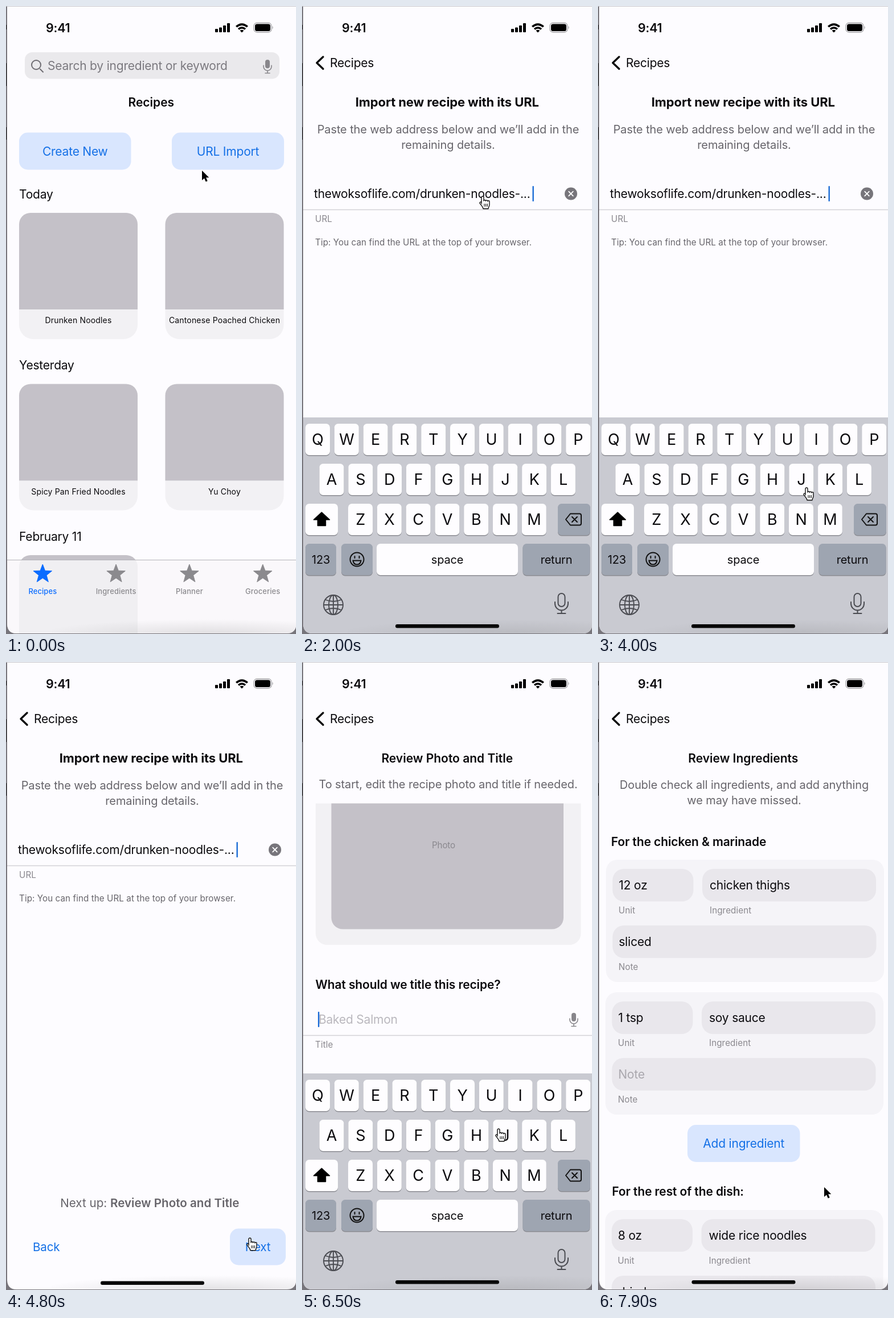
Animation of 509x1099 px, one loop 8000 ms. Source, as an HTML page:

```html
<!DOCTYPE html>
<html lang="en">
<head>
<meta charset="utf-8">
<title>Recipe import</title>
<style>
  html, body { margin: 0; width: 100%; height: 100%; overflow: hidden; background: #fdfcff; }
  svg { display: block; width: 100vw; height: 100vh; }
  text { font-family: Inter, Roboto, sans-serif; letter-spacing: -.01em; white-space: pre; }
</style>
</head>
<body>
<svg id="stage" viewBox="0 0 509 1099" xmlns="http://www.w3.org/2000/svg"></svg>
<script>
const LOOP = 8000, STEP = 100;
const BG = '#fdfcff', INK = '#0b0a0d', GRAY = '#67656b', SOFT = '#8a888e', HINT = '#b9b7bd';
const BLUE = '#1470e6', TINT = '#d9e6fe', PHOTO = '#c4c1c8', PANEL = '#f2f1f4';

// --- drawing helpers ---
// Text is placed by the vertical centre of its capitals.
function text(x, cy, str, { size = 21, fill = INK, weight = 400, anchor = 'start', track = -.01 } = {}) {
  return `<text x="${x}" y="${(cy + size * .36).toFixed(1)}" font-size="${size}" fill="${fill}" font-weight="${weight}" text-anchor="${anchor}" style="letter-spacing:${track}em">${str}</text>`;
}
const middle = (x, cy, str, opt) => text(x, cy, str, { anchor: 'middle', ...opt });
const box = (x, y, w, h, r, fill) => `<rect x="${x}" y="${y}" width="${w}" height="${h}" rx="${r}" fill="${fill}"/>`;
const line = (d, color, width) => `<path d="${d}" fill="none" stroke="${color}" stroke-width="${width}" stroke-linecap="round" stroke-linejoin="round"/>`;
const at = (x, y, content) => `<g transform="translate(${x} ${y})">${content}</g>`;
const para = (y, str) => middle(256.5, y, str, { size: 20, fill: GRAY, track: -.006 });
const small = (x, y, str, fill = SOFT) => text(x, y, str, { size: 15.2, fill, track: .005 });
const heading = (x, y, str) => text(x, y, str, { weight: 600, track: -.006 });
const title = (str, opt) => middle(254.8, 168, str, { weight: 600, track: 0, ...opt });
const rule = y => `<path d="M2 ${y}H509" stroke="#d3d2d6" stroke-width="1.3"/>`;
const caret = (x, cy) => box(x, cy - 13.5, 2.4, 27, 1, '#1b6bd6');
const button = (x, y, w, str, h = 65) => box(x, y, w, h, 15, TINT) + middle(x + w / 2, y + h / 2, str, { fill: BLUE });
const homeBar = (x, y = 1083.5) => box(x, y, 182, 6.5, 3.2, '#000');

const mic = (x, y) => at(x, y,
  box(-4, -12, 8, 15, 4, '#88868b') + line('M-7 -2v2a7 7 0 0 0 14 0v-2M0 7v4M-4 11.5h8', '#88868b', 1.6));

function star(cx, cy, r, fill) {
  const points = Array.from({ length: 10 }, (_, i) => {
    const a = i * Math.PI / 5 - Math.PI / 2, d = i % 2 ? r * .42 : r;
    return `${(cx + d * Math.cos(a)).toFixed(1)},${(cy + d * Math.sin(a)).toFixed(1)}`;
  });
  return `<polygon points="${points.join(' ')}" fill="${fill}" stroke="${fill}" stroke-linejoin="round"/>`;
}

// --- shared parts ---
function statusBar() {
  const bars = [6, 8.5, 12, 16].map((h, i) => box(367 + i * 7, 46 - h, 5, h, 1.3, '#000')).join('');
  const wifi = '<path d="M403 35q11 -9.5 22 0l-2.4 2.6q-8.6 -7 -17.2 0zM406.8 39.2q7.2 -6 14.4 0l-2.4 2.5q-4.8 -3.8 -9.6 0zM410.6 43q3.4 -2.6 6.8 0l-3.4 3.6z"/>';
  return text(70, 38, '9:41', { weight: 600, size: 21.5 }) + bars + wifi +
    '<rect x="435" y="29.5" width="31" height="16.5" rx="5.5" fill="none" stroke="#a5a4a8" stroke-width="1.3"/>' +
    box(437, 31.5, 27, 12.5, 3.6, '#000') + '<path d="M467.5 35q2.5 2.7 0 5.5z" fill="#a5a4a8"/>';
}

const backLink = line('M37 89L26 99.5L37 110', '#000', 3.3) + text(49, 99, 'Recipes');

function footer(next, dx, enabled) {
  const label = enabled ? BLUE : HINT;
  const upNext = `Next up: <tspan font-weight="600">${next}</tspan>`;
  return middle(252.3 + dx, 947, upNext, { size: 20.6, fill: GRAY, track: 0 }) +
    text(47 + dx, 1024, 'Back', { fill: BLUE, size: 20.6 }) +
    box(393 - dx * 1.5, 991.5, 98, 64, 15, enabled ? TINT : '#e9e8eb') +
    middle(442 - dx * 1.5, 1024, 'Next', { fill: label, size: 20.6 }) + homeBar(166 - dx);
}

function keyboard() {
  const key = (x, y, w, label = '', dark = false, size = 27) =>
    box(x, y + 1.5, w, 55, 6.5, '#8b8c92') + box(x, y, w, 55, 6.5, dark ? '#9ea5b1' : '#fefdff') +
    middle(x + w / 2, y + 27.5, label, { size });
  const row = (letters, x, y) => [...letters].map((c, i) => key(x + i * 50.8, y, 43, c)).join('');
  const face = '<circle r="12"/><path d="M-7 2h14q-1 7 -7 7t-7 -7z"/><path d="M-4 -5.5v3M4 -5.5v3"/>';
  const globe = '<circle r="17"/><ellipse rx="8" ry="17"/><path d="M0 -17v34M-17 0h34M-14 -9q14 6 28 0M-14 9q14 -6 28 0"/>';
  return box(2, 720, 508, 380, 0, '#c9cad1') +
    row('QWERTYUIOP', 6, 731) + row('ASDFGHJKL', 30.5, 801) + row('ZXCVBNM', 81, 871) +
    key(6, 871, 57) + '<path d="M34.5 886l14 13h-7v10.5h-14v-10.5h-7z" stroke="#000" stroke-width="1.5" stroke-linejoin="round"/>' +
    key(449, 871, 57, '', true) + line('M463 898.5l8 -10h16q3 0 3 3v14q0 3 -3 3h-16zM474 894l9 9M483 894l-9 9', '#111', 2) +
    key(6, 941, 54, '123', true, 20) + key(69, 941, 55, '', true) +
    at(96.5, 968.5, `<g fill="none" stroke="#111" stroke-width="2" stroke-linecap="round">${face}</g>`) +
    key(131, 941, 248, 'space', false, 20) + key(387.5, 941, 118, 'return', true, 20) +
    at(55, 1048, `<g fill="none" stroke="#4b4c52" stroke-width="1.9">${globe}</g>`) +
    at(455.5, 1045, line('M-6 -11a6 6 0 0 1 12 0v11a6 6 0 0 1 -12 0zM-11.5 -2v3a11.5 11.5 0 0 0 23 0v-3M0 12.5v5.5M-7 18h14', '#4b4c52', 2)) +
    homeBar(164, 1082);
}

// --- screens ---
function card(x, y, label) {
  return box(x, y, 208, 221, 25, PANEL) +
    `<path d="M${x} ${y + 169}v-149a20 20 0 0 1 20 -20h168a20 20 0 0 1 20 20v149z" fill="${PHOTO}"/>` +
    middle(x + 104, y + 188, label, { size: 14, track: .012 });
}

function home() {
  const tabs = ['Recipes', 'Ingredients', 'Planner', 'Groceries'].map((name, i) => {
    const x = 64.3 + i * 128.8, fill = i ? '#8b8a8e' : '#0a6cff';
    return star(x, 994, 17, fill) + middle(x, 1024, name, { size: 12.9, weight: 500, fill, track: .01 });
  }).join('');
  return box(33, 81, 447, 46.5, 13, '#eae9ec') +
    line('M60 110.5l5 5M61 103a8 8 0 1 0 -16 0a8 8 0 1 0 16 0', '#6f6d73', 2) +
    text(73, 104.5, 'Search by ingredient or keyword', { fill: '#7b797f' }) + mic(459, 106) +
    title('Recipes') + button(23, 221.5, 196.5, 'Create New') + button(291, 221.5, 197, 'URL Import') +
    text(23, 329, 'Today') + card(23, 362, 'Drunken Noodles') + card(279.5, 362, 'Cantonese Poached Chicken') +
    text(23, 628, 'Yesterday') + card(23, 661.5, 'Spicy Pan Fried Noodles') + card(279.5, 661.5, 'Yu Choy') +
    text(23, 928, 'February 11') + card(23, 961, '') +
    '<rect x="2" y="969" width="508" height="130" fill="#f9f8fb" opacity=".84"/>' +
    '<path d="M2 969.5H509" stroke="#b4b3b8"/>' + tabs;
}

// A single-line input with its rule and caption; gap is the distance to the rule.
function field(cy, hint, value, end, label, gap = 28) {
  const content = value
    ? text(21, cy, value) + caret(end, cy) +
      at(472, cy, '<circle r="11" fill="#77757b"/>' + line('M-3.8 -3.8l7.6 7.6M3.8 -3.8l-7.6 7.6', '#fff', 1.8))
    : text(29, cy, hint, { fill: HINT }) + caret(28, cy) + mic(477, cy + .5);
  return content + rule(cy + gap) + small(23, cy + gap + 16, label);
}

function urlPage(value, keys) {
  return backLink + title('Import new recipe with its URL', { weight: 700, size: 22, track: -.005 }) +
    para(216, 'Paste the web address below and we’ll add in the') + para(243, 'remaining details.') +
    field(328.5, 'simplyrecipes.com/', value, 404.5, 'URL') +
    small(23, 413, 'Tip: You can find the URL at the top of your browser.', GRAY) +
    (keys ? keyboard() : footer('Review Photo and Title', 0, value));
}

function photoPage(value, keys) {
  const question = y => heading(23.5, y, 'What should we title this recipe?');
  const photoLabel = (x, y) => middle(x, y, 'Photo', { size: 15.2, fill: SOFT });
  const body = keys
    ? `<g clip-path="url(#scrolled)">${box(24, 156, 465.5, 339, 20, PANEL)}${box(51.5, 183, 407.5, 284.5, 20, PHOTO)}</g>` +
      photoLabel(248.5, 320.5) + question(564) + field(625.5, 'Baked Salmon', value, 187, 'Title') + keyboard()
    : heading(23, 314, 'Photo') + text(426, 314, 'Edit', { size: 15.4, fill: BLUE }) +
      box(23, 342.5, 465, 339, 20, PANEL) + box(50, 370, 407.5, 284, 20, PHOTO) + photoLabel(254, 512) +
      question(750) + field(792, 'Baked Salmon', value, 187, 'Title') + footer('Review Ingredients', 1.3, value);
  return backLink + title('Review Photo and Title') + para(214, 'To start, edit the recipe photo and title if needed.') + body;
}

function ingredient(x, y, unit, name, note) {
  const fill = '#e9e7ec';
  return at(x, y, box(0, 0, 488, 214, 20, '#f5f4f8') +
    box(11.5, 16, 142, 57, 20, fill) + box(169, 16, 305, 57, 20, fill) + box(11.5, 115, 463, 57, 20, fill) +
    text(22.5, 44.5, unit) + text(182, 44.5, name) +
    text(22.5, 143.5, note || 'Note', { fill: note ? INK : '#a9a7ad' }) +
    small(22, 88.5, 'Unit') + small(182, 88.5, 'Ingredient') + small(22, 187, 'Note'));
}

function ingredientsPage() {
  return backLink + title('Review Ingredients') +
    para(215, 'Double check all ingredients, and add anything') + para(242, 'we may have missed.') +
    heading(23, 314, 'For the chicken &amp; marinade') +
    ingredient(14, 346, '12 oz', 'chicken thighs', 'sliced') +
    ingredient(13, 578, '1 tsp', 'soy sauce', '') +
    button(157, 810, 197.5, 'Add ingredient') + heading(24.5, 926.5, 'For the rest of the dish:') +
    ingredient(12.5, 959, '8 oz', 'wide rice noodles', 'dried') + homeBar(164.5, 1082);
}

// --- timeline ---
const url = 'thewoksoflife.com/drunken-noodles-...', dish = 'Drunken Noodles';
const scenes = [
  [0, home()], [1000, urlPage('')], [1500, urlPage('', true)], [1900, urlPage(url, true)],
  [4200, urlPage(url)], [5100, photoPage('')], [6100, photoPage('', true)],
  [6600, photoPage(dish, true)], [6800, photoPage(dish)], [7500, ingredientsPage()]
];
const path = [
  [0, 344, 288], [400, 348, 256], [1000, 348, 256], [1400, 317, 333], [2700, 317, 333],
  [3200, 366, 843], [4200, 366, 843], [4800, 428, 1008], [5100, 428, 1008], [5700, 336, 798],
  [6100, 336, 798], [6500, 345, 817], [6700, 347, 822], [6900, 378, 889], [7300, 422, 1002],
  [7500, 422, 1002], [7900, 397, 919]
];
const shapes = [
  [0, 'arrow'], [200, 'hand'], [1000, 'arrow'], [1400, 'hand'], [4200, 'arrow'], [4800, 'hand'],
  [5100, 'arrow'], [5700, 'hand'], [6800, 'arrow'], [7300, 'hand'], [7500, 'arrow']
];

const arrow = '<path d="M0 0V17L4 13.4L6.7 19.5L9.7 18.2L7.1 12.3H12.3Z" stroke="#fff" stroke-width="1.8" paint-order="stroke"/>';
const hand = '<g transform="translate(-6 0)" fill="#fff" stroke="#111" stroke-width="1.4" stroke-linejoin="round">' +
  '<path d="M4 13V2a2 2 0 0 1 4 0v6a1.7 1.7 0 0 1 3.4 .3a1.7 1.7 0 0 1 3.4 .6a1.6 1.6 0 0 1 3.2 .8v5c0 3 -2 4 -2 7H7c0 -3 -3 -5 -6 -9.5a1.7 1.7 0 0 1 3 -1.5z"/>' +
  '<path d="M9 13v5M11.7 13v5M14.4 13v5" stroke-width="1.1"/></g>';

const stage = document.getElementById('stage');
stage.innerHTML = `<defs>
    <clipPath id="screen"><path d="M2 1H509V1086q-3 12 -16 12H18q-15 0 -16 -16z"/></clipPath>
    <clipPath id="scrolled"><rect x="0" y="247.5" width="509" height="300"/></clipPath>
    <radialGradient id="shade" cx=".65" cy="1" r=".7"><stop offset="0" stop-color="#777" stop-opacity=".2"/><stop offset="1" stop-color="#777" stop-opacity="0"/></radialGradient>
  </defs>
  <rect width="509" height="1099" fill="#77757b"/><rect width="509" height="1" fill="#c9c8cc"/>
  ${[[33, 8], [100, 40], [212, 22]].map(([y, h]) => box(0, y, 1, h, 0, '#222')).join('')}
  <g clip-path="url(#screen)">${box(2, 1, 508, 1098, 0, BG)}${statusBar()}
    ${scenes.map(s => `<g class="scene">${s[1]}</g>`).join('')}
    <rect x="80" y="1062" width="429" height="37" fill="url(#shade)"/>
  </g>
  <g id="pointer"><g id="arrow">${arrow}</g><g id="hand">${hand}</g></g>`;

const sceneNodes = [...stage.querySelectorAll('.scene')];
const pointer = document.getElementById('pointer');
const cursors = ['arrow', 'hand'].map(id => document.getElementById(id));
const show = (node, on) => node.style.display = on ? '' : 'none';
const indexAt = (table, t) => table.findLastIndex(entry => entry[0] <= t);

function pointerAt(t) {
  const i = indexAt(path, t), [t0, x0, y0] = path[i], [t1, x1, y1] = path[i + 1] || [LOOP, x0, y0];
  const p = (t - t0) / (t1 - t0), e = p * p * (3 - 2 * p);
  return [x0 + (x1 - x0) * e, y0 + (y1 - y0) * e];
}

function render(t) {
  const scene = indexAt(scenes, t), shape = shapes[indexAt(shapes, t)][1];
  sceneNodes.forEach((node, i) => show(node, i === scene));
  cursors.forEach(node => show(node, node.id === shape));
  pointer.setAttribute('transform', `translate(${pointerAt(t).join(' ')})`);
}

const start = performance.now();
function tick() {
  render(Math.floor((performance.now() - start) % LOOP / STEP) * STEP);
  requestAnimationFrame(tick);
}
tick();
</script>
</body>
</html>
```
